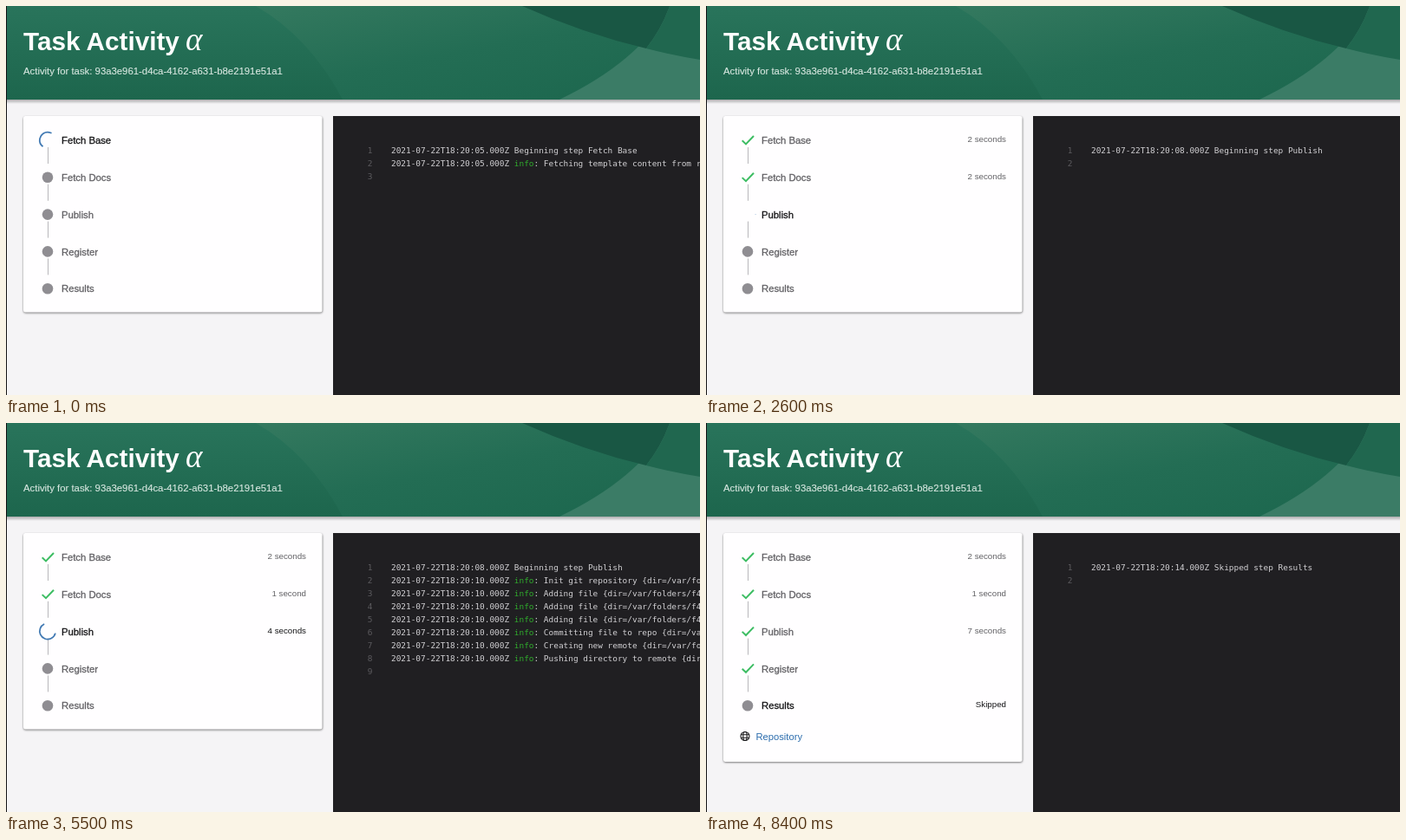
Animation, 800 px wide and 449 px high, one loop 8900 ms. Source, as an HTML page:

```html
<!DOCTYPE html>
<html lang="en">
<head>
<meta charset="utf-8">
<title>Task Activity</title>
<style>
  html, body { margin: 0; width: 100%; height: 100%; overflow: hidden; background: #f5f4f6; }
  svg { display: block; width: 100%; height: 100%; }
  text { font-family: "Liberation Sans", Arial, sans-serif; white-space: pre; }
  .step { font-size: 11.3px; stroke-width: .3px; }
  .time { font-size: 9.75px; text-anchor: end; }
  .log text { font-family: "DejaVu Sans Mono", monospace; font-size: 9.43px; fill: #d2d1d4; }
  .log .num { fill: #5c5b5f; text-anchor: end; }
</style>
</head>
<body>
<svg viewBox="0 0 800 449" preserveAspectRatio="none">
  <defs>
    <linearGradient id="left" x2="0" y2="1">
      <stop offset="0" stop-color="#29745b"/><stop offset="1" stop-color="#1d664d"/>
    </linearGradient>
    <linearGradient id="mid" x2=".9" y2="1">
      <stop offset="0" stop-color="#34795f"/><stop offset=".5" stop-color="#236d54"/><stop offset="1" stop-color="#1c674e"/>
    </linearGradient>
    <linearGradient id="fade" x2="0" y2="1">
      <stop offset="0" stop-color="#000" stop-opacity=".3"/><stop offset="1" stop-color="#000" stop-opacity="0"/>
    </linearGradient>
    <filter id="blur" x="-5%" y="-5%" width="110%" height="110%"><feGaussianBlur stdDeviation="1"/></filter>
  </defs>

  <rect width="800" height="449" fill="#f5f4f6"/>
  <rect y="108" width="800" height="5" fill="url(#fade)"/>
  <rect width="800" height="108" fill="url(#left)"/>
  <path d="M288 0Q350 36 388 108H800V0Z" fill="url(#mid)"/>
  <path d="M765 0Q730 64 638 108H800V0Z" fill="#3b7c66"/>
  <path d="M595 0Q666 32 738 49Q756 26 765 0Z" fill="#195744"/>
  <path d="M765 0Q756 26 738 49Q769 57 800 62V0Z" fill="#20674f"/>
  <text x="20" y="51" font-size="29.7" font-weight="bold" fill="#fff">Task Activity</text>
  <text x="207" y="51" font-size="37" fill="#fff" style="font-family:'Liberation Serif',Times,serif;font-style:italic">α</text>
  <text x="20" y="79" font-size="11.35" fill="#d6e6df" stroke="#d6e6df" stroke-width=".15">Activity for task: 93a3e961-d4ca-4162-a631-b8e2191e51a1</text>

  <rect id="shade" x="20" y="128" width="345" fill="#000" opacity=".5" rx="3" filter="url(#blur)"/>
  <rect id="card" x="20" y="127" width="344.5" fill="#fffeff" rx="2.5"/>
  <g id="steps"></g>
  <g id="link">
    <g fill="none" stroke="#1c1c1e" stroke-width="1.1">
      <circle cx="45" cy="361.5" r="5"/>
      <ellipse cx="45" cy="361.5" rx="2.2" ry="5"/>
      <path d="M40.4 359.8H49.6M40.4 363.2H49.6"/>
    </g>
    <text x="57.5" y="365.5" font-size="11.2" fill="#2b6cad">Repository</text>
  </g>

  <rect x="377" y="127" width="423" height="322" fill="#201f22"/>
  <g id="log" class="log"></g>
  <rect width="1" height="449" fill="#161517"/>
</svg>
<script>
const LOOP = 8900, TICK = 100, SPIN = 1400;
const DOCS = 1500, PUBLISH = 2600, PUSH = 4700, DONE = 8400;
const SKIP = 854; // time dropped when the push log arrives
const names = ["Fetch Base", "Fetch Docs", "Publish", "Register", "Results"];
const starts = [-392, DOCS, PUBLISH];
const $ = id => document.getElementById(id);

function add(parent, tag, attrs, text) {
  const el = document.createElementNS("http://www.w3.org/2000/svg", tag);
  for (const k in attrs) el.setAttribute(k, attrs[k]);
  if (text) el.textContent = text;
  return parent.appendChild(el);
}
const set = (el, attrs) => { for (const k in attrs) el.setAttribute(k, attrs[k]); };
const show = (el, on) => el.setAttribute("visibility", on ? "visible" : "hidden");

const rows = names.map((name, i) => {
  const g = add($("steps"), "g", { transform: `translate(0 ${i * 42.8})` });
  if (i < 4) add(g, "path", { d: "M48.5 163V182", stroke: "#b9b8bb", "stroke-width": 1 });
  return {
    dot: add(g, "circle", { cx: 48, cy: 155, r: 6.3, fill: "#8f8d92" }),
    check: add(g, "path", { d: "M41.7 155.3L46 159.4L55 150", fill: "none", stroke: "#3dbd63", "stroke-width": 2 }),
    ring: add(g, "circle", { r: 20.2, fill: "none", stroke: "#4179b3", "stroke-width": 3.9 }),
    label: add(g, "text", { x: 64, y: 159.2, class: "step" }, name),
    time: add(g, "text", { x: 346, y: 157, class: "time" })
  };
});

const info = (time, text) => [time, "info", ": " + text];
const begin = (time, text) => [time, "", text];
const fetched = "Fetching template content from remote URL";
const dir = " {dir=/var/folders/f4/";
const logs = {
  base: [begin("05", "Beginning step Fetch Base"), info("05", fetched)],
  docs: [begin("07", "Beginning step Fetch Docs"), info("07", fetched)],
  publish: [begin("08", "Beginning step Publish")],
  results: [begin("14", "Skipped step Results")]
};
logs.push = logs.publish.concat(
  ["Init git repository", "Adding file", "Adding file", "Adding file",
   "Committing file to repo", "Creating new remote", "Pushing directory to remote"]
    .map(s => info("10", s + dir)));

let shown;
function showLog(key) {
  if (key === shown) return;
  shown = key;
  $("log").replaceChildren();
  const lines = logs[key];
  for (let i = 0; i <= lines.length; i++) {
    const y = 169.5 + 15 * i;
    add($("log"), "text", { x: 422.5, y, class: "num" }, i + 1);
    if (i === lines.length) break;
    const [time, level, text] = lines[i];
    const line = add($("log"), "text", { x: 444, y }, `2021-07-22T18:20:${time}.000Z `);
    if (level) add(line, "tspan", { fill: "#30ad2d" }, level);
    add(line, "tspan", {}, text);
  }
}

// cubic-bezier(.42, 0, .58, 1)
function ease(x) {
  let lo = 0, hi = 1;
  for (let i = 0; i < 24; i++) {
    const u = (lo + hi) / 2, v = 1 - u;
    if (1.26 * v * v * u + 1.74 * v * u * u + u * u * u < x) lo = u; else hi = u;
  }
  return lo * lo * (3 - 2 * lo);
}

function spin(ring, age) {
  const p = (age / SPIN) % 1;
  const e = ease(p * 2 % 1);
  const [len, off] = p < .5 ? [1 + 99 * e, 15 * e] : [100, 15 + 110 * e];
  set(ring, {
    transform: `translate(48 154.8) scale(${20 / 44}) rotate(${360 * p})`,
    "stroke-dasharray": `${len} 200`,
    "stroke-dashoffset": -off
  });
}

const secs = n => n === 1 ? "1 second" : n + " seconds";

function times(t, now) {
  const pub = Math.floor((now - PUBLISH - 30) / 1000);
  return [
    t < 610 ? "" : secs(t < 1610 ? 3 : 2),
    t < DOCS + 1000 ? "" : secs(t < DOCS + 2000 ? 2 : 1),
    pub < 1 ? "" : secs(Math.min(pub + 1, 7)),
    "",
    t < DONE ? "" : "Skipped"
  ];
}

function draw(t) {
  const now = t < PUSH ? t : t + SKIP;
  const active = t < DOCS ? 0 : t < PUBLISH ? 1 : t < DONE ? 2 : 4;
  const clock = times(t, now);
  rows.forEach((r, i) => {
    const on = i === active, spins = on && i < 3;
    show(r.check, i < active);
    show(r.ring, spins);
    show(r.dot, i >= active && !spins);
    if (spins) spin(r.ring, now - starts[i]);
    const ink = on ? "#151517" : "#626165";
    set(r.label, { fill: ink, stroke: ink });
    r.time.setAttribute("fill", ink);
    r.time.textContent = clock[i];
  });
  const done = t >= DONE;
  show($("link"), done);
  $("card").setAttribute("height", done ? 264 : 226.5);
  $("shade").setAttribute("height", done ? 264 : 226.5);
  showLog(done ? "results" : t >= PUSH ? "push" : ["base", "docs", "publish"][active]);
}

const origin = performance.now();
function frame() {
  const t = (performance.now() - origin) % LOOP;
  draw(Math.floor(t / TICK) * TICK);
  requestAnimationFrame(frame);
}
frame();
</script>
</body>
</html>
```
